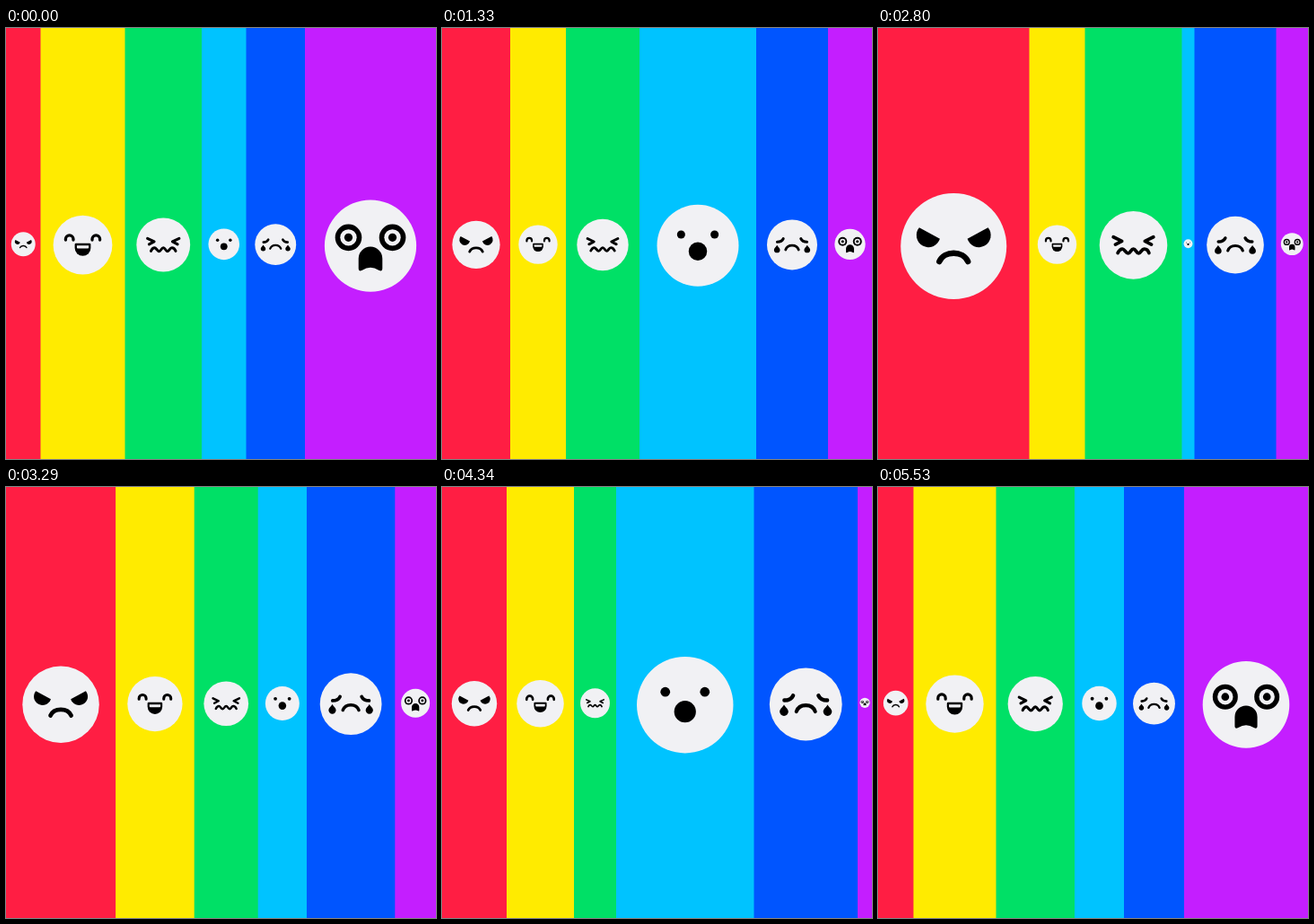
An HTML page with a canvas that plays this animation: 479 px wide and 480 px high, repeating every 5.6 s.

```html
<!DOCTYPE html>
<html>
<head>
<meta charset="utf-8">
<style>
html, body { margin: 0; width: 100%; height: 100%; overflow: hidden; }
canvas { display: block; }
</style>
</head>
<body>
<canvas id="stage" width="479" height="480"></canvas>
<script>
const W = 479, H = 480, LOOP = 5600, STEP = 70, PERIOD = LOOP - STEP;
const WHITE = '#f1f1f4', BLACK = '#000';
const ctx = document.getElementById('stage').getContext('2d');

// Faces are drawn in units where the head has radius 100.
function shape(d, color = BLACK) {
  ctx.fillStyle = color;
  ctx.fill(new Path2D(d));
}
function line(d, width) {
  ctx.lineWidth = width;
  ctx.stroke(new Path2D(d));
}
function disc(x, y, r, color = BLACK) {
  ctx.fillStyle = color;
  ctx.beginPath();
  ctx.arc(x, y, r, 0, 2 * Math.PI);
  ctx.fill();
}
function mirrored(draw) {
  draw();
  ctx.save();
  ctx.scale(-1, 1);
  draw();
  ctx.restore();
}

function angry() {
  mirrored(() => shape('M-65 -35 L-26 -14 A22.6 22.6 0 1 1 -65 -35Z'));
  line('M-27 29 C-18 8 18 8 27 29', 11);
}
function happy() {
  mirrored(() => line('M-58 -17 V-20 a13 13 0 0 1 26 0 V-17', 10));
  shape('M-27 -2 Q-27 -6 -23 -6 H23 Q27 -6 27 -2 V10 A27 27 0 0 1 -27 10Z');
  shape('M-20 2 H20 V9 Q20 12 17 12 H-17 Q-20 12 -20 9Z', WHITE);
}
function queasy() {
  mirrored(() => line('M-59 -24 L-34 -12 L-53 -2', 10));
  line('M-46 23 C-42 14 -37 11 -32 11 S-22 24 -15.5 24 S-7 11 0 11 ' +
       'S9 24 15.5 24 S24 11 32 11 S42 14 46 23', 10);
}
function surprised() {
  mirrored(() => disc(-41, -27, 10));
  disc(0, 14, 22.5);
}
function sad() {
  mirrored(() => {
    line('M-59 -11 Q-41 -11 -35 -24', 11);
    shape('M-60 1 C-56 8 -48 13 -48 20 a12 12 0 0 1 -24 0 C-72 13 -64 8 -60 1Z');
  });
  line('M-26 20 C-18 -3 18 -3 26 20', 10);
}
function shocked() {
  mirrored(() => {
    disc(-48, -18, 29);
    disc(-48, -18, 18, WHITE);
    disc(-48, -18, 9);
  });
  shape('M-26 50 V28 A26 26 0 0 1 26 28 V50 Q26 57 18 53 Q0 42 -18 53 Q-26 57 -26 50Z');
}

const bands = [
  ['#ff1e43', angry], ['#ffeb00', happy], ['#00e066', queasy],
  ['#00c3ff', surprised], ['#0055ff', sad], ['#c41eff', shocked]
];

// Time, then the widths of the first five bands; the last takes the rest.
const keys = [
  [70, 38.5, 94, 85.5, 49.5, 65.5],
  [315, 60, 60, 80, 62, 80],
  [630, 98.5, 35.5, 86, 101.5, 99.5],
  [980, 108, 35, 90, 122, 88],
  [1330, 76, 62, 82, 130, 80],
  [1680, 43, 95, 70, 122, 79],
  [2030, 66, 112, 61, 96, 80],
  [2415, 124, 92, 88, 48, 86],
  [2800, 168.5, 62, 108, 14, 91],
  [3150, 145, 72, 86, 36, 96],
  [3500, 84, 115, 48, 86, 100],
  [3850, 47.5, 142, 29.5, 130.5, 91],
  [4340, 72, 75, 47, 153.5, 115.5],
  [4760, 100, 42, 80, 136, 97],
  [5110, 84, 56, 95, 100, 80],
  [5530, 39.5, 92, 87.5, 55, 67]
];

// Key i of the endless cycle, with its time shifted by whole periods.
function keyAt(i) {
  const n = keys.length, [time, ...widths] = keys[(i + n) % n];
  return [time + Math.floor(i / n) * PERIOD, ...widths];
}

function widthsAt(t) {
  const i = keys.findLastIndex(k => k[0] <= t);
  const [a, b, c, d] = [-1, 0, 1, 2].map(k => keyAt(i + k));
  const span = c[0] - b[0], u = (t - b[0]) / span;
  const widths = [1, 2, 3, 4, 5].map(j => {
    const m0 = (c[j] - a[j]) / (c[0] - a[0]) * span;
    const m1 = (d[j] - b[j]) / (d[0] - b[0]) * span;
    const ease = u * u * (3 - 2 * u);
    return b[j] + (c[j] - b[j]) * ease + m0 * u * (1 - u) ** 2 - m1 * u * u * (1 - u);
  });
  return [...widths, W - widths.reduce((sum, w) => sum + w)];
}

function render(now) {
  const t = Math.max(STEP, Math.floor(now % LOOP / STEP) * STEP);
  let x = 0;
  widthsAt(t).forEach((w, i) => {
    const [color, face] = bands[i], r = w * 0.35;
    ctx.fillStyle = color;
    ctx.fillRect(x, 0, W - x, H);
    ctx.save();
    ctx.translate(x + w / 2, 240 + r * 0.05);
    ctx.scale(r / 100, r / 100);
    ctx.lineCap = ctx.lineJoin = 'round';
    disc(0, 0, 100, WHITE);
    face();
    ctx.restore();
    x += w;
  });
}

const start = performance.now();
function tick() {
  render(performance.now() - start);
  requestAnimationFrame(tick);
}
tick();
</script>
</body>
</html>
```
